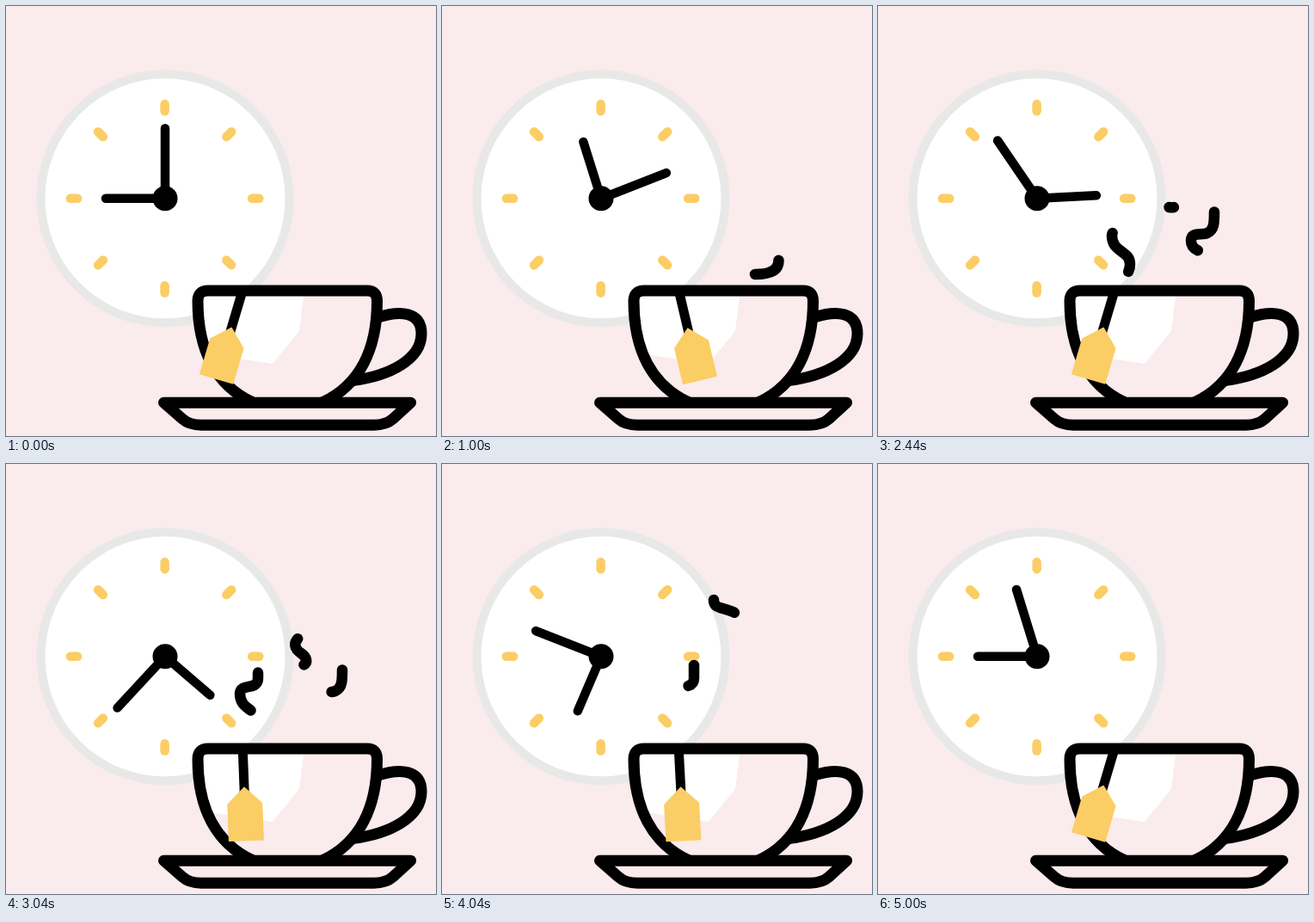
An HTML page that plays this animation: 500x500 px, repeating every 5040 ms.

```html
<!DOCTYPE html>
<html lang="en">
<head>
<meta charset="utf-8">
<title>Tea time</title>
<style>
  html, body { margin: 0; width: 100%; height: 100%; overflow: hidden; background: #faebec; }
  svg { display: block; width: 100%; height: 100%; }
  .ink { fill: none; stroke: #000; stroke-width: 12.5; stroke-linecap: round; stroke-linejoin: round; }
  #cup .ink { stroke-width: 13; }
  .solid, #cup .solid { fill: #faebec; }
  .hand { stroke-width: 10.5; }
  .tick { stroke: #fbcd65; stroke-width: 10.5; stroke-linecap: round; }
</style>
</head>
<body>
<svg viewBox="0 0 500 500">
  <circle cx="185" cy="223.8" r="144.5" fill="#fff" stroke="#e8e8e8" stroke-width="10"/>
  <g id="ticks" transform="translate(184.6 223.8)"></g>
  <g transform="translate(185 223.8)">
    <path id="hour" class="ink hand" d="M0 0V-69"/>
    <path id="minute" class="ink hand" d="M0 0V-81.5"/>
    <circle r="14.5"/>
  </g>

  <g id="cup">
    <path class="ink" d="M434 361.500C458 354 483 355 483 381C483 411 446 430 403 435.500"/>
    <path class="solid" d="M223 343Q223 331 235 331H420Q431.500 331 431.500 343C431.500 400 410.500 441 368 461H287C244 441 223 400 223 343Z"/>
    <path fill="#fff" d="M223 331H347L341 378L310 416L237 405Q223 380 223 343Z"/>
    <path class="ink" d="M287 461C244 441 223 400 223 343Q223 331 235 331H420Q431.500 331 431.500 343C431.500 400 410.500 441 368 461"/>
    <path class="ink solid" d="M183.500 461.200H470.500L450 480Q442 487.200 428 487.200H227Q213 487.200 205 480Z"/>
  </g>

  <g id="bag">
    <path class="ink" style="stroke-width:11" d="M0 2V52"/>
    <path fill="#fbcd65" d="M0 45L20.500 64.500V108H-20.500V64.500Z"/>
  </g>
  <g id="steam"></g>
</svg>
<script>
const LOOP = 5040, STEP = 40, LAP = 840, HOUR_END = 4960;
const SVG = 'http://www.w3.org/2000/svg';
const $ = id => document.getElementById(id);

function add(parent, attrs) {
  const el = document.createElementNS(SVG, 'path');
  for (const key in attrs) el.setAttribute(key, attrs[key]);
  return parent.appendChild(el);
}

const progress = (t, from, to) => Math.min(1, Math.max(0, (t - from) / (to - from)));
const smooth = u => u * u * (3 - 2 * u);

for (let a = 0; a < 360; a += 45) {
  add($('ticks'), { class: 'tick', d: 'M0-101.500V-109.700', transform: `rotate(${a})` });
}

// Each wisp is drawn by its head and erased by its tail: [start, end] in ms.
const wisps = [
  { d: 'M364 312C380 312 391.500 308 391.500 296C391.500 284 364 290 364 273C364 262 376 267 383 264C391 260 391 252 391 239.500',
    head: [525, 2190], tail: [1370, 3620] },
  { d: 'M276 316C288 316 293 310 293 300C293 284 272 287 272 267C273 254 293 264 293 249V234',
    head: [1200, 3200], tail: [2030, 4680] },
  { d: 'M338.500 234C352 236 352 226 343 220C334 214 334 206 343 200C350 193 350 178 338.500 172C324 166 316 168 316 158L317 140.500',
    head: [2360, 4310], tail: [2930, 4700] }
];
for (const w of wisps) {
  w.el = add($('steam'), { class: 'ink', d: w.d });
  w.len = w.el.getTotalLength();
}

// The bag turns round at these times, then rests.
const turns = [0, 1240, 2440, 3540, 4680];
const SWING = 16.5;

function swing(t) {
  let angle = SWING, side = -1;
  for (let i = 1; i < turns.length; i++) {
    angle += side * 2 * SWING * smooth(progress(t, turns[i - 1], turns[i]));
    side = -side;
  }
  return angle;
}

const turn = (id, deg) => $(id).setAttribute('transform', `rotate(${deg})`);

function draw(t) {
  turn('hour', 270 + 360 * progress(t, 0, HOUR_END));
  turn('minute', 360 * t / LAP);
  $('bag').setAttribute('transform', `translate(275.2 330.4) rotate(${swing(t)})`);
  for (const { el, len, head, tail } of wisps) {
    const from = progress(t, ...tail), to = progress(t, ...head);
    el.style.display = to > from ? '' : 'none';
    el.style.strokeDasharray = `${(to - from) * len} ${len * 2}`;
    el.style.strokeDashoffset = -from * len;
  }
}

const start = performance.now();
function frame() {
  const t = (performance.now() - start) % LOOP;
  draw(Math.floor(t / STEP) * STEP);
  requestAnimationFrame(frame);
}
frame();
</script>
</body>
</html>
```
